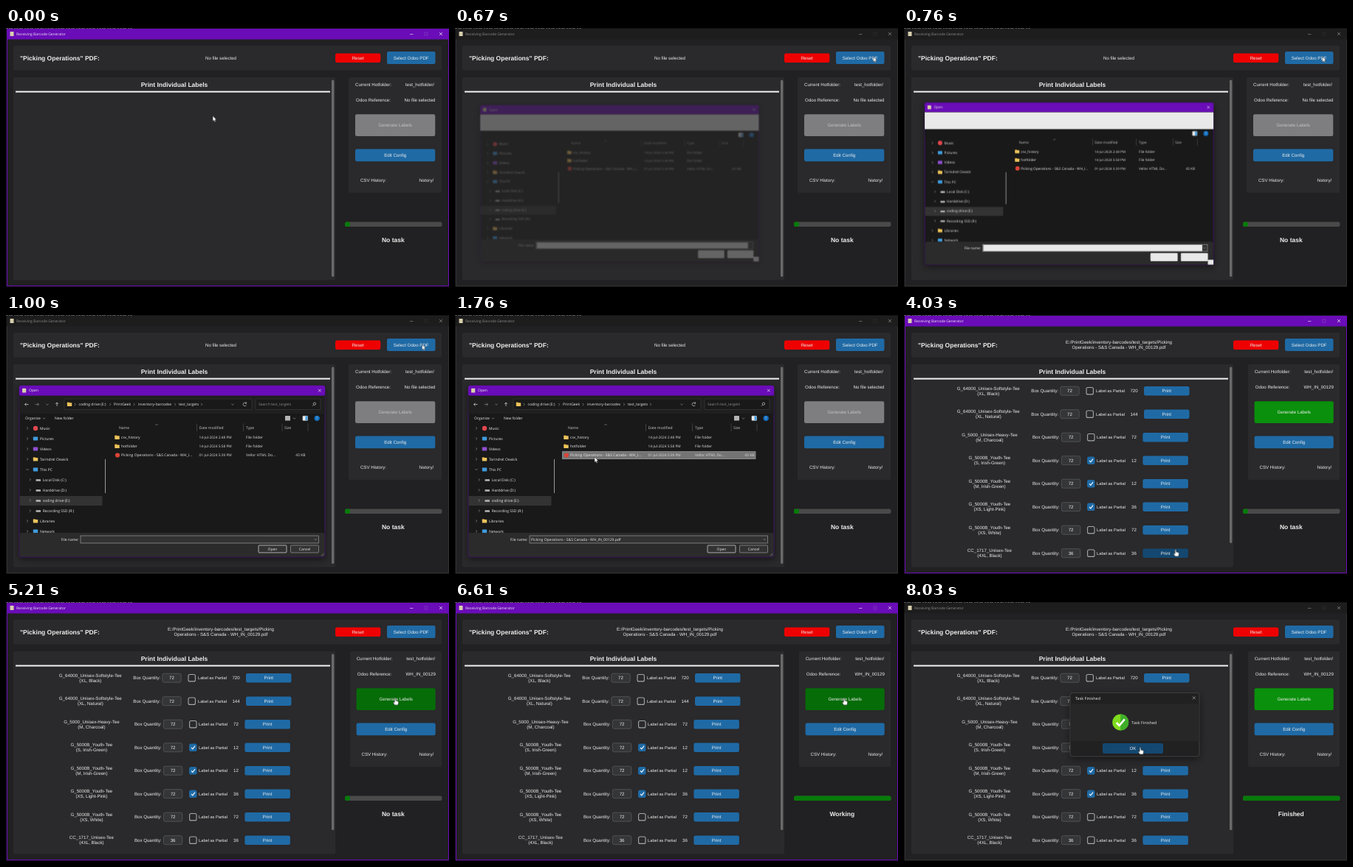
An HTML page for the animation above (8.21 s loop, 600 by 352 pixels).

```html
<!DOCTYPE html>
<html lang="en">
<head>
<meta charset="utf-8">
<title>Receiving Barcode Generator</title>
<style>
  html, body { margin: 0; width: 100%; height: 100%; overflow: hidden; background: #111; }
  svg { display: block; width: 100vw; height: 100vh; }
  text { font-family: "Liberation Sans", Arial, sans-serif; text-rendering: geometricPrecision; white-space: pre; }
  text.ui { font-family: "Open Sans", "Noto Sans", sans-serif; }
</style>
</head>
<body>
<svg id="stage" viewBox="0 0 600 352"></svg>
<script>
const LOOP = 8210;
const BODY = '#212022', PANEL = '#2a292b', BLUE = '#1f6aa5', BLUE_DARK = '#144870';
const PURPLE = '#6a0cb8', WHITE = '#eee';
const stage = document.getElementById('stage');

// ---- drawing helpers ----
function add(parent, tag, attrs = {}, text) {
  const el = document.createElementNS('http://www.w3.org/2000/svg', tag);
  for (const k in attrs) el.setAttribute(k, attrs[k]);
  if (text !== undefined) el.textContent = text;
  return parent.appendChild(el);
}
const group = parent => add(parent, 'g');
const rect = (g, x, y, x2, y2, fill, rx = 0, more = {}) =>
  add(g, 'rect', { x, y, width: x2 - x, height: y2 - y, fill, rx, ...more });
const box = (g, x, y, x2, y2, fill, stroke, rx = 1) =>
  rect(g, x, y, x2, y2, fill, rx, { stroke, 'stroke-width': .7 });
const shadow = (g, x, y, x2, y2) =>
  rect(g, x, y + 3, x2, y2 + 3, '#000', 3, { style: 'filter: blur(5px); opacity: .5' });
const dot = (g, cx, cy, r, fill) => add(g, 'circle', { cx, cy, r, fill });
const line = (g, d, stroke = '#ccc', w = .7) =>
  add(g, 'path', { d, stroke, 'stroke-width': w, fill: 'none', 'stroke-linejoin': 'round' });
function label(g, x, y, str, { size = 6.15, fill = WHITE, anchor = 'middle', bold, ui } = {}) {
  return add(g, 'text', {
    x, y: y + size * .35, 'font-size': size, fill, 'text-anchor': anchor,
    'font-weight': bold ? 700 : 400, class: ui ? 'ui' : ''
  }, str);
}
const head = (g, x, y, str, more) => label(g, x, y, str, { size: 8.5, bold: true, ...more });
const ui = (g, x, y, str, more) => label(g, x, y, str, { size: 5, anchor: 'start', ui: true, ...more });
function button(g, x, y, x2, y2, str, fill = BLUE, color = WHITE) {
  const face = rect(g, x, y, x2, y2, fill, 2.2);
  label(g, (x + x2) / 2, (y + y2) / 2, str, { fill: color });
  return face;
}
const chevron = (g, x, y, turn = 0, stroke = '#aaa') =>
  add(g, 'path', { d: 'M-.8-1.6L.8 0L-.8 1.6', stroke, 'stroke-width': .6, fill: 'none',
    transform: `translate(${x} ${y}) rotate(${turn})` });
const cross = (g, x, y, r, stroke) =>
  line(g, `M${x - r} ${y - r}l${2 * r} ${2 * r}m0 ${-2 * r}l${-2 * r} ${2 * r}`, stroke);
function folder(g, x, y) {
  rect(g, x - 3.2, y - 2.8, x, y, '#c9952f', .5);
  rect(g, x - 3.2, y - 2, x + 3.2, y + 2.6, '#ecc35c', .5);
}

// ---- timing helpers ----
const tracks = [];
function play(el, prop, steps, easing = 'step-end') {
  const frames = steps.map(([t, v]) => ({ offset: t / LOOP, [prop]: v, easing }));
  frames.push({ offset: 1, [prop]: steps[steps.length - 1][1] });
  const track = el.animate(frames, { duration: LOOP, fill: 'both' });
  track.pause();
  tracks.push(track);
}
// times alternate between on and off
function show(el, ...times) {
  const steps = times.map((t, i) => [t, 1 - i % 2]);
  if (times[0] > 0) steps.unshift([0, 0]);
  play(el, 'opacity', steps);
}

// ---- main window ----
const win = group(stage);
rect(win, 0, 0, 600, 352, '#111');
add(win, 'path', { d: 'M0 .5H172', stroke: '#555', 'stroke-dasharray': '3 1 5 2 2 1' });
rect(win, 1, 1, 600, 351, BODY);

function titleBar(active) {
  const g = group(win), ink = active ? '#eee' : '#8c8c8c';
  rect(g, 1.5, 1.5, 599.5, 350.5, 'none', 0, { stroke: active ? PURPLE : '#333' });
  rect(g, 1, 1, 600, 15.5, active ? PURPLE : '#1d1d1e');
  rect(g, 5.5, 5, 10.5, 11, '#d8cfae', .5);
  ui(g, 14, 8, 'Receiving Barcode Generator', { size: 4.95, fill: ink });
  line(g, 'M547 8.5h4.5', ink, .6);
  line(g, 'M567 6h4v4h-4z', active ? '#8a45c6' : '#333', .6);
  cross(g, 589, 8, 2, ink);
  return g;
}
show(titleBar(true), 0, 640, 2640, 6790);
show(titleBar(false), 640, 2640, 6790);

rect(win, 10, 24, 590, 57.5, PANEL, 2);
head(win, 19, 40.8, '"Picking Operations" PDF:', { anchor: 'start' });
button(win, 446, 34.5, 507.3, 47, 'Reset', '#ee0000');
const pick = button(win, 516, 32, 581.5, 49, 'Select Odoo PDF');
play(pick, 'fill', [[0, BLUE], [360, BLUE_DARK], [640, BLUE]]);

const empty = group(win);
label(empty, 291, 41, 'No file selected');
show(empty, 0, 3300);
const chosen = group(win);
label(chosen, 291, 37.3, 'E:/PrintGeek/inventory-barcodes/test_targets/Picking');
label(chosen, 291, 44.3, 'Operations - S&S Canada - WH_IN_00129.pdf');
show(chosen, 3300);

// ---- label list ----
rect(win, 10, 67, 446, 342.5, PANEL, 2);
head(win, 228, 77.5, 'Print Individual Labels');
rect(win, 13, 85.6, 439, 87.6, '#f2f2f2');
const thumb = rect(win, 441, 70.5, 444.4, 338, '#6a6a6a', 1.6);
play(thumb, 'height', [[0, '267.5px'], [3580, '239.5px']]);

const items = [
  ['G_64000_Unisex-Softstyle-Tee', '(XL, Black)', 72, 720],
  ['G_64000_Unisex-Softstyle-Tee', '(XL, Natural)', 72, 144],
  ['G_5000_Unisex-Heavy-Tee', '(M, Charcoal)', 72, 72],
  ['G_5000B_Youth-Tee', '(S, Irish-Green)', 72, 12],
  ['G_5000B_Youth-Tee', '(M, Irish-Green)', 72, 12],
  ['G_5000B_Youth-Tee', '(XS, Light-Pink)', 72, 36],
  ['G_5000B_Youth-Tee', '(XS, White)', 72, 72],
  ['CC_1717_Unisex-Tee', '(4XL, Black)', 36, 36]
];
items.forEach(([name, kind, size, count], i) => {
  const g = group(win), y = 103.2 + i * 31.5, dx = i < 2 ? 0 : 1.6;
  label(g, 114.3 + dx, y - 3.4, name);
  label(g, 114.3 + dx, y + 3.6, kind);
  label(g, 172.3 + dx, y, 'Box Quantity:', { anchor: 'start' });
  box(g, 211.8 + dx, y - 6, 237.2 + dx, y + 6, '#343638', '#5c6164', 2);
  label(g, 224.5 + dx, y, size);
  const on = count < size;
  rect(g, 247 + dx, y - 4.7, 256.4 + dx, y + 4.7, on ? BLUE : 'none', 2,
    { stroke: on ? BLUE : '#a4a9ad', 'stroke-width': 1.1 });
  if (on) line(g, `M${249.4 + dx} ${y + .2}l1.8 2l3.2 -4.2`, '#fff', 1.1);
  label(g, 260 + dx * .7, y, 'Label as Partial', { size: 5.65, anchor: 'start' });
  label(g, 311.5, y, count);
  const face = button(g, 325 - dx, y - 6.2, 386.5 - dx, y + 6.2, 'Print');
  if (i === 7) play(face, 'fill', [[0, BLUE], [4000, BLUE_DARK], [4620, BLUE]]);
  show(g, 3340 + Math.round(i * 240 / 7));
});

// ---- side panel ----
function sidePanel(dx, ref, fill, ink) {
  const g = group(win);
  rect(g, 464 + dx, 67, 590, 224, PANEL, 2);
  label(g, 497.5 + dx * .8, 77.3, 'Current Hotfolder:');
  label(g, 560.5 + dx * .6, 77.3, 'test_hotfolder/');
  label(g, 497.5 + dx * .8, 98.3, 'Odoo Reference:');
  label(g, 560.5 + dx * .6, 98.3, ref);
  const face = button(g, 473 + dx * .8, 117.3, 581.3 + dx * .2, 147, 'Generate Labels', fill, ink);
  button(g, 473 + dx * .8, 164.5, 581.3 + dx * .2, 181.3, 'Edit Config');
  label(g, 497.5 + dx * .8, 207.3, 'CSV History:');
  label(g, 569.3, 207.3, 'history/');
  return [g, face];
}
const [idle] = sidePanel(0, 'No file selected', '#7e7d7f', '#c4c4c4');
show(idle, 0, 3300);
const [ready, generate] = sidePanel(2, 'WH_IN_00129', '#0a900c', WHITE);
show(ready, 3300);
play(generate, 'fill', [[0, '#0a900c'], [5170, '#066c08'], [6790, '#0a900c']]);

// ---- progress ----
rect(win, 459, 263.4, 590.5, 270, '#4a4a4b', 2.5);
const bar = rect(win, 459, 263.4, 466, 270, '#087a0a', 2.5);
const ticks = [5910, 5940, 5970, 6000, 6060, 6090, 6240, 6360, 6450, 6610];
play(bar, 'width', [[0, '7px'], ...ticks.map((t, i) => [t, `${(i + 1) * 13.15}px`])]);
[['No task', 0, 5910], ['Working', 5910, 6790], ['Finished', 6790]].forEach(([str, ...times]) =>
  show(head(win, 524.3, 287.8, str), ...times));

// ---- file dialog ----
const dlg = group(stage);
dlg.style.transformOrigin = '225px 212.5px';
shadow(dlg, 18, 96, 432, 329);
rect(dlg, 18, 96, 432, 329, '#191919', 3, { stroke: '#4b1680', 'stroke-width': .8 });
rect(dlg, 18, 96, 432, 109.8, PURPLE, 2);
rect(dlg, 22, 99.8, 27.2, 105.4, '#d8cfae', .5);
ui(dlg, 31, 102.6, 'Open');
cross(dlg, 424.8, 102.6, 1.8, '#eee');

// address row
rect(dlg, 18, 109.8, 432, 134, '#1f1f1f');
line(dlg, 'M30.5 121.5h-5m2-2l-2 2l2 2', '#ddd');
line(dlg, 'M39.5 121.5h5m-2-2l2 2l-2 2', '#888');
chevron(dlg, 56, 121.5, 90);
line(dlg, 'M69 124v-5m-2 2l2-2l2 2', '#ddd');
box(dlg, 79, 114, 333, 128.5, '#191919', '#3c3c3c');
box(dlg, 338, 114, 426, 128.5, '#191919', '#3c3c3c');
folder(dlg, 86, 121.3);
chevron(dlg, 93.5, 121.5);
[[98.5, 'coding drive (E:)', 141], [146, 'PrintGeek', 173.5],
 [179, 'inventory-barcodes', 229], [234, 'test_targets', 265]].forEach(([x, str, end]) => {
  ui(dlg, x, 121.3, str);
  chevron(dlg, end, 121.5);
});
chevron(dlg, 307, 121.5, 90);
line(dlg, 'M325.3 120a2.3 2.3 0 1 0 .2 2.4M325.6 118.4v1.8h-1.8');
ui(dlg, 342, 121.3, 'Search test_targets', { fill: '#8e8e8e' });
line(dlg, 'M415 123.8l1.6-1.6M419.6 120.7a1.7 1.7 0 1 1-3.4 0a1.7 1.7 0 1 1 3.4 0');

// toolbar
ui(dlg, 26, 140.3, 'Organize');
chevron(dlg, 51.5, 140.5, 90);
ui(dlg, 66, 140.3, 'New folder');
rect(dlg, 378, 137, 385, 143.5, '#b5b5b5', .5);
chevron(dlg, 390.5, 140.5, 90);
box(dlg, 402, 137.3, 408.5, 143.3, '#eee', '#ccc', .5);
rect(dlg, 405.5, 137.3, 408.5, 143.3, '#4aa0e0');
dot(dlg, 421.2, 140.3, 3.6, '#1372c4');
ui(dlg, 421.2, 140.3, '?', { anchor: 'middle' });

// folder tree
rect(dlg, 18.5, 246, 130.5, 259, '#333');
const tree = [
  ['Music', '#e0484e'], ['Pictures', '#3f9bdc'], ['Videos', '#8d4fd0'], ['Tarindrel Oswick', 'folder'],
  ['This PC', '#3f9bdc'], ['Local Disk (C:)', 'disk'], ['Harddrive (D:)', 'disk'],
  ['coding drive (E:)', 'disk'], ['Recording SSD (R:)', 'disk'], ['Libraries', 'folder'], ['Network', '#3f9bdc']
];
tree.forEach(([name, icon], i) => {
  const y = 154 + i * 14, dx = icon === 'disk' ? 3.7 : 0;
  chevron(dlg, 29 + dx, y, i === 4 ? 90 : 0);
  if (icon === 'folder') folder(dlg, 40, y);
  else if (icon === 'disk') rect(dlg, 40.5, y - .8, 47, y + 1.8, '#b8b8b8', .6);
  else if (i === 0) dot(dlg, 40, y, 3.2, icon);
  else rect(dlg, 36.8, y - 2.5, 43.2, y + 2.4, icon, .7);
  ui(dlg, 46 + dx, y, name);
});
rect(dlg, 134, 196, 135, 242, '#9a9a9a');

// file list
[[153, 'Name'], [261.5, 'Date modified'], [325, 'Type'], [377, 'Size']].forEach(([x, str]) =>
  ui(dlg, x, 153, str, { fill: '#ccc' }));
[258.5, 321.5, 374, 409].forEach(x => rect(dlg, x - .3, 147.5, x + .3, 158, '#555'));
chevron(dlg, 204, 149, -90);
const hover = rect(dlg, 145.5, 185.7, 407, 195.6, '#4a4a4a');
show(hover, 1390, 1760);
const selected = box(dlg, 145.5, 185.7, 407, 195.6, '#747474', '#a5a5a5', 0);
show(selected, 1760);
const files = [
  ['csv_history', '14-Jul-2024 2:48 PM', 'File folder'],
  ['hotfolder', '14-Jul-2024 5:58 PM', 'File folder'],
  ['Picking Operations - S&S Canada - WH_I...', '01-Jul-2024 5:39 PM', 'Vellor HTML Do...', '43 KB']
];
files.forEach(([name, date, type, size], i) => {
  const y = 166.3 + i * 12.1;
  if (i < 2) folder(dlg, 150.5, y); else dot(dlg, 151, y, 3.1, '#db4437');
  ui(dlg, 156, y, name);
  ui(dlg, 261.5, y, date, { size: 4.8, fill: '#ddd' });
  ui(dlg, 325, y, type, { fill: '#ddd' });
  if (size) ui(dlg, 405.5, y, size, { anchor: 'end', fill: '#ddd' });
});

// footer
rect(dlg, 18.4, 296, 431.6, 328.6, '#2b2b2c', 3);
ui(dlg, 98.5, 305, 'File name:', { anchor: 'end' });
box(dlg, 101, 300, 423.5, 310, '#323233', '#9a9a9a', 0);
chevron(dlg, 419.3, 305, 90);
const mark = rect(dlg, 102.6, 301.6, 225.5, 308.6, '#1470c0');
show(mark, 2450);
show(ui(dlg, 103, 305, 'Picking Operations - S&S Canada - WH_IN_00129.pdf'), 1760);
const openFace = box(dlg, 342, 313, 380, 323, '#333', '#e2e2e2');
play(openFace, 'fill', [[0, '#333'], [2100, '#454545'], [2300, '#666'], [2450, '#454545']]);
box(dlg, 385.5, 313, 423.5, 323, '#333', '#9b9b9b');
ui(dlg, 361, 317.8, 'Open', { anchor: 'middle' });
ui(dlg, 404.5, 317.8, 'Cancel', { anchor: 'middle' });
line(dlg, 'M426.5 327.5l4-4m-2 4l2-2', '#888', .6);

// controls not painted yet
const blank = group(dlg);
rect(blank, 18.4, 134, 396, 147, '#191919');
[[18, 109.8, 432, 134], [102, 300.6, 416, 309.6], [342, 312.5, 380.5, 324],
 [385.5, 312.5, 424, 324], [424, 322, 432, 329]].forEach(b => rect(blank, ...b, '#e9e9e9'));
show(blank, 0, 830);

play(dlg, 'opacity', [[0, 0], [640, 0], [740, 1], [2640, 1], [2790, .24], [2910, 0]], 'linear');
play(dlg, 'transform', [
  [0, 'translate(-2.5px,-1.6px) scale(.9)'], [640, 'translate(-2.5px,-1.6px) scale(.9)'],
  [760, 'translate(-1.5px,-1px) scale(.944)'], [880, 'translate(0px,0px) scale(1)'],
  [2640, 'translate(0px,0px) scale(1)'], [2790, 'translate(-1.5px,-1px) scale(.949)'],
  [2910, 'translate(-2.5px,-1.6px) scale(.9)']
], 'linear');

// ---- finished message ----
const msg = group(stage);
msg.style.transformOrigin = '312.5px 166.5px';
shadow(msg, 225, 123.3, 400, 210);
rect(msg, 225, 123.3, 400, 210, '#212122', 3, { stroke: '#4a4a4b', 'stroke-width': .8 });
rect(msg, 225.4, 138.5, 399.6, 189, '#272728');
ui(msg, 232, 131, 'Task Finished', { size: 5.5 });
cross(msg, 392.8, 130.3, 1.9, '#bbb');
dot(msg, 293.2, 163.5, 11, '#7fdb1e');
add(msg, 'path', { d: 'M293.2 152.5a11 11 0 0 1 0 22z', fill: '#3fae2a' });
line(msg, 'M287.8 164l3.8 4l7.2-8.6', '#fff', 2.6);
ui(msg, 308.3, 163.8, 'Task Finished', { size: 5.5 });
const ok = button(msg, 269, 192, 351, 206, 'OK');
play(ok, 'fill', [[0, BLUE], [7500, BLUE_DARK]]);
play(msg, 'opacity', [[0, 0], [6790, 0], [6900, 1]], 'linear');
play(msg, 'transform', [[0, 'scale(.9)'], [6790, 'scale(.9)'], [7030, 'scale(1)']], 'ease-out');

// ---- pointer ----
const pointer = group(stage);
const arrow = add(pointer, 'path', {
  d: 'M0 0V7.2L1.7 5.7L2.8 8.2L4 7.7L2.9 5.2H5.1Z', fill: '#fff', stroke: '#111', 'stroke-width': .4
});
const hand = add(pointer, 'path', {
  d: 'M-.8.6Q0-.5.8.6V3.4L4.2 4.4Q4.9 4.7 4.7 5.6L4 9.6H-.4L-2.6 6.4Q-2.6 5.2-1.6 5.5L-.8 6.2Z',
  fill: '#fff', stroke: '#111', 'stroke-width': .5
});
const handTimes = [360, 640, 3730, 4650, 5170, 6790, 7490];
show(hand, ...handTimes);
show(arrow, 0, ...handTimes);
play(pointer, 'transform', [
  [0, 280, 119.5], [390, 566.5, 39], [970, 566.5, 39], [1450, 189, 193], [1760, 189, 193],
  [2120, 367.8, 318.5], [4550, 367.8, 318.5], [5210, 527, 130.5], [7150, 527, 130.5],
  [7210, 517, 130.5], [7330, 517, 130.5], [7520, 320, 197.5]
].map(([t, x, y]) => [t, `translate(${x}px,${y}px)`]), 'ease-in-out');

// ---- one clock for every track ----
const start = performance.now();
function tick() {
  const t = Math.round(performance.now() - start) % LOOP;
  tracks.forEach(track => { track.currentTime = t; });
  requestAnimationFrame(tick);
}
tick();
</script>
</body>
</html>
```
